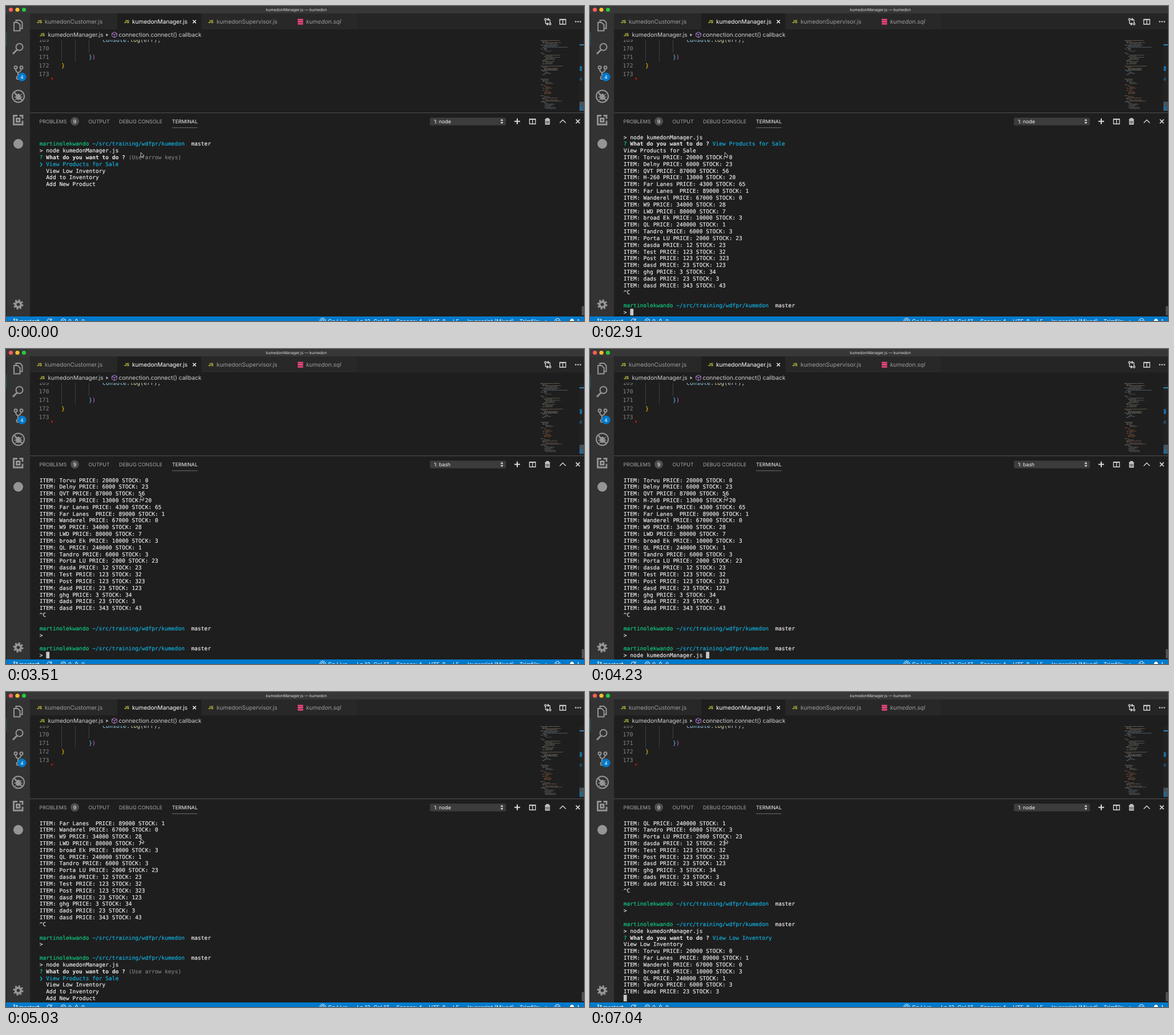
Write an HTML page that moves like this. It is 1013 px wide and 553 px high and loops after 8000 ms.

```html
<!DOCTYPE html>
<html lang="en">
<head>
<meta charset="utf-8">
<title>Terminal session</title>
<style>
  html, body { margin: 0; width: 100%; height: 100%; overflow: hidden; background: #1e1e1e; }
  svg { display: block; }
  text { font-family: Inter, Roboto, sans-serif; font-size: 10.15px; text-rendering: geometricPrecision; white-space: pre; fill: #d0d0d0; }
  .mono text, #rows text { font-family: "DejaVu Sans Mono", monospace; }
  .mono text { font-size: 10px; }
  #rows text { font-size: 9.6px; color: #f0f0f0; }
  #rows text, #rows tspan { fill: currentColor; stroke: currentColor; stroke-width: .15; }
  #rows .g { color: #10ce85; }
  #rows .c { color: #10b4e4; }
  #rows .d { color: #808080; }
  #rows .b { font-weight: bold; stroke: none; }
  .js { font-size: 7.4px; font-weight: 700; fill: #d6d640; }
  .off { fill: #9c9c9c; }
  .on { fill: #fff; }
  .caps text { font-size: 8.9px; fill: #a8a8a8; }
  .caps .on { fill: #f4f4f4; }
  .status text { font-size: 9.6px; fill: #fff; }
  .line { fill: none; stroke: #dcdcdc; stroke-width: 1.3; }
  .side { fill: none; stroke: #959595; stroke-width: 2; }
</style>
</head>
<body>
<svg width="1013" height="553" viewBox="0 0 1013 553">
  <rect width="1013" height="553" fill="#1e1e1e"/>

  <!-- title bar -->
  <rect width="1013" height="13" fill="#373737"/>
  <circle cx="8.5" cy="6.5" r="3.6" fill="#ff5f57"/>
  <circle cx="20" cy="6.5" r="3.6" fill="#febc2e"/>
  <circle cx="31.5" cy="6.5" r="3.6" fill="#28c840"/>
  <text x="509" y="9" text-anchor="middle" style="font-size:6.85px;fill:#e0e0e0">kumedonManager.js — kumedon</text>

  <!-- tabs -->
  <rect x="42" y="13" width="971" height="28" fill="#252526"/>
  <path d="M42 13h152.5v28H42zM342.5 13h156v28h-156zM499.5 13h115.5v28h-115.5z" fill="#282828"/>
  <rect x="195" y="13" width="147" height="28" fill="#1e1e1e"/>
  <text class="js" x="54" y="30.2">JS</text>
  <text class="off" x="68" y="31.2">kumedonCustomer.js</text>
  <text class="js" x="207" y="30.2">JS</text>
  <text class="on" x="221" y="31.2">kumedonManager.js</text>
  <path class="line" style="stroke:#fff" d="M327.5 24.8l5.5 5.5m0-5.5l-5.5 5.5"/>
  <text class="js" x="354.5" y="30.2">JS</text>
  <text class="off" x="369" y="31.2">kumedonSupervisor.js</text>
  <g fill="#e8457a">
    <rect x="511" y="22.5" width="10" height="3" rx="1.4"/>
    <rect x="511" y="26.1" width="10" height="3" rx="1.4"/>
    <rect x="511" y="29.7" width="10" height="3" rx="1.4"/>
  </g>
  <text class="off" x="526" y="31.2" font-style="italic">kumedon.sql</text>
  <g class="line">
    <circle cx="945.5" cy="23.5" r="1.6"/><circle cx="953.5" cy="31.5" r="1.6"/>
    <path d="M945.5 25v4.5q0 2 2 2h2.5m-2-2.3l2.3 2.3l-2.3 2.3M953.5 30v-4.500q0-2-2-2h-2.5m2-2.300l-2.300 2.300l2.300 2.300"/>
    <path d="M970.5 23.5h10.5v8.5h-10.5zM975.8 23.5v8.5M970.5 24h10.5"/>
  </g>
  <g fill="#dcdcdc"><circle cx="998.5" cy="27.5" r="1.2"/><circle cx="1002.5" cy="27.5" r="1.2"/><circle cx="1006.5" cy="27.5" r="1.2"/></g>

  <!-- editor -->
  <g class="mono" id="code">
    <path d="M97.5 59v38M121.5 59v38M145.5 59v23" stroke="#404040" fill="none"/>
    <text x="169" y="63" style="fill:#9cdcfe">console<tspan fill="#d4d4d4">.</tspan><tspan fill="#dcdcaa">log</tspan><tspan fill="#d4d4d4">(err);</tspan></text>
    <text x="145" y="93" style="fill:#5cc8f5">}<tspan fill="#da70d6">)</tspan></text>
    <text x="97" y="108" style="fill:#ffd700">}</text>
    <path d="M79.5 125l3.5 2.5l-3.5 2.5z" fill="#c4161c"/>
  </g>
  <rect x="42" y="41" width="971" height="18.5" fill="#1e1e1e"/>
  <text class="js" x="59" y="53.3">JS</text>
  <text x="73.5" y="54.2">kumedonManager.js</text>
  <path d="M175.5 48l4 2.700l-4 2.700z" fill="#aaa"/>
  <path d="M190 45.8l4.3 2.2v5l-4.3 2.3l-4.3-2.3v-5zM185.7 48l4.3 2.3l4.3-2.3M190 50.3v5" fill="none" stroke="#b180d7"/>
  <text x="197.5" y="54.2">connection.connect() callback</text>
  <g id="map"></g>
  <rect x="1005" y="60" width="8" height="127" fill="#222"/>
  <g fill="#1b6aa0">
    <rect x="1005" y="67.5" width="8" height="1.5" fill="#3aa0dc"/>
    <rect x="1005.5" y="105.5" width="4" height="8.5"/>
    <rect x="1005.5" y="126" width="4" height="5" fill="#1d4d6b"/>
    <rect x="1005" y="168" width="8" height="16" fill="#47535b"/>
    <rect x="1005.5" y="176" width="4" height="8"/>
  </g>

  <!-- panel header -->
  <path d="M42 187.5h971" stroke="#505050"/>
  <g class="caps">
    <text x="58.5" y="205.7">PROBLEMS</text>
    <circle cx="120.5" cy="202.5" r="7.5" fill="#4d4d4d"/>
    <text class="on" x="120.5" y="205.7" text-anchor="middle">9</text>
    <text x="144.5" y="205.7">OUTPUT</text>
    <text x="198" y="205.7">DEBUG CONSOLE</text>
    <text class="on" x="291" y="205.7">TERMINAL</text>
    <path d="M291 213.7h44.5" stroke="#707070"/>
    <rect x="743" y="196" width="133" height="13.5" rx="2" fill="#3c3c3c"/>
    <text class="on" id="shell" x="750" y="205.7">1: node</text>
  </g>
  <path d="M866.5 201.5l2.5-3.3l2.5 3.3zM866.5 203.7l2.5 3.3l2.5-3.3z" fill="#e4e4e4"/>
  <g class="line">
    <path d="M896 197.5v10M891 202.5h10" style="stroke-width:2"/>
    <path d="M917.5 198.5h10.5v8.5h-10.5zM922.8 198.5v8.5M917.5 199h10.5"/>
    <path d="M944.5 199.2h9M947.3 199v-1.5h3.4v1.5"/>
    <path d="M945.5 200.5h7v7h-7zM947.7 201v6M950.3 201v6"/>
    <path d="M970.5 205.3l5.3-5.3l5.3 5.3"/>
    <path d="M998.8 199.2l6.800 6.800m0-6.800l-6.800 6.800" style="stroke-width:1.7"/>
  </g>
  <rect x="1009" y="527" width="4" height="16" fill="#505050"/>

  <!-- terminal -->
  <g id="rows"></g>
  <rect id="caret" width="5.8" height="11.6" fill="#c8c8c8"/>
  <path d="M236.3 257v8.6l2-1.8l1.4 3l1.4-.7l-1.4-2.8h2.6z" fill="#111" stroke="#e8e8e8" stroke-width=".8"/>

  <!-- activity bar -->
  <rect y="13" width="42" height="532" fill="#333"/>
  <rect y="13" width="1" height="532" fill="#1c1c1c"/>
  <rect y="45" width="1" height="24" fill="#0e5a66"/>
  <g class="side">
    <path d="M17.5 29v-4h7l4 4v10.5h-4"/>
    <path d="M14 29h6.5l4 4v10.5H14z"/>
    <circle cx="23.5" cy="72" r="6"/><path d="M19 77l-7 7" style="stroke-width:3"/>
    <circle cx="17" cy="108" r="2.5"/><circle cx="27" cy="108" r="2.5"/><circle cx="21" cy="126" r="2.5"/>
    <path d="M17 110.5q0 5 4 6.5q5-1.5 6-6.5M21 117v6.5"/>
    <circle cx="21.5" cy="158.5" r="10.5"/>
    <ellipse cx="21.5" cy="159.5" rx="3.5" ry="4.5" fill="#959595"/>
    <path d="M15 155l4 2M28 155l-4 2M14.5 160h14M15.5 165l4-2M27.5 165l-4-2" style="stroke-width:1.3"/>
    <path d="M14 151l15 15"/>
    <path d="M20 192.5h-6.500v15.500h15.500v-6.500M23.500 192.500h5.500v5.500M18.500 197.500h5.500v5.500h-5.500z" style="stroke-width:2.800"/>
    <circle cx="21.5" cy="524" r="4.8" style="stroke-width:4"/>
    <circle cx="21.5" cy="524" r="7.5" stroke-dasharray="2.945" style="stroke-width:3"/>
  </g>
  <circle cx="21.5" cy="242" r="8.5" fill="#959595"/>
  <circle cx="28" cy="124.5" r="7.5" fill="#007acc"/>
  <text class="on" x="28" y="127.6" text-anchor="middle" style="font-size:8.5px">4</text>

  <!-- status bar -->
  <rect y="545" width="1013" height="8" fill="#007acc"/>
  <g class="status" id="status">
    <g fill="none" stroke="#fff">
      <circle cx="14.5" cy="550" r="1.2"/><circle cx="19" cy="551" r="1.2"/><path d="M14.5 551v3"/>
      <path d="M72 553a4 4 0 0 1 7-2.5m1-2v3h-3"/>
      <circle cx="100.5" cy="553" r="4"/><path d="M99 551.5l3 3m0-3l-3 3M119.5 556l4-7l4 7z"/>
      <circle cx="555" cy="553" r="5"/><circle cx="555" cy="553" r="2.5"/>
      <circle cx="966.5" cy="553" r="4.5"/>
    </g>
    <path d="M964 551h1.5v1.5h-1.5zM967.5 551h1.5v1.5h-1.5zM988 554q1-5 4-5t4 5z" fill="#fff"/>
  </g>
</svg>

<script>
const $ = id => document.getElementById(id);
const LOOP = 8000, ROWS = 27, LINE_H = 11.83, CHAR_W = 5.779, LEFT = 58.8;

// static repeats
for (let n = 169; n <= 173; n++)
  $("code").innerHTML += `<text x="75.5" y="${63 + (n - 169) * 15}" text-anchor="end" style="fill:#858585">${n}</text>`;

$("status").innerHTML += [
  [23, "master*"], [109, "0"], [132, "0"], [564, "Go Live"], [615, "Ln 12, Col 17"], [684, "Spaces: 4"],
  [741, "UTF-8"], [783, "LF"], [806, "Javascript (Mixed)"], [900, "Trimfile: ✓"], [1001, "1"]
].map(([x, s]) => `<text x="${x}" y="556.5">${s}</text>`).join("");

// minimap: blocks of [first y, last y, widest line, colour]
const rand = n => Math.abs(Math.sin(n * 12.9898) * 43758.5453) % 1;
const blocks = [
  [60, 67, 48, "#b5a08c"], [68, 74, 66, "#8fa5b0"], [75, 80, 14, "#888"], [82, 102, 26, "#9a9a88"],
  [105, 111, 42, "#b09a80"], [112, 120, 30, "#8fa5b0"], [128, 137, 18, "#a0a090"],
  [138, 154, 20, "#c07850"], [157, 167, 38, "#b09080"], [168, 181, 24, "#8f9ca5"]
];
let map = "";
for (const [top, end, wide, color] of blocks)
  for (let y = top; y < end; y += 1.9) {
    const indent = y === top ? 0 : 3 + Math.floor(rand(y) * 3) * 3;
    const w = 4 + (wide - 4) * rand(y + 7) ** 1.5;
    map += `<path d="M${937 + indent} ${y + .5}h${w}" stroke="${color}" stroke-dasharray="4 .8 2.5 .6" opacity=".55"/>`;
  }
$("map").innerHTML = map;

// terminal contents
const span = (cls, s) => `<tspan class="${cls}">${s}</tspan>`;
const item = ([name, price, stock]) => `ITEM: ${name} PRICE: ${price} STOCK: ${stock}`;
const stock = [
  ["Torvu", 20000, 0], ["Delny", 6000, 23], ["QVT", 87000, 56], ["H-260", 13000, 20],
  ["Far Lanes", 4300, 65], ["Far Lanes ", 89000, 1], ["Wanderel", 67000, 0], ["W9", 34000, 28],
  ["LWD", 80000, 7], ["broad Ek", 10000, 3], ["QL", 240000, 1], ["Tandro", 6000, 3],
  ["Porta LU", 2000, 23], ["dasda", 12, 23], ["Test", 123, 32], ["Post", 123, 323],
  ["dasd", 23, 123], ["ghg", 3, 34], ["dads", 23, 3], ["dasd", 343, 43]
];
const options = ["View Products for Sale", "View Low Inventory", "Add to Inventory", "Add New Product"];
const prompt = ["", span("g", "martinolekwando") + " " + span("c", "~/src/training/wdfpr/kumedon") + "  master"];
const command = "&gt; node kumedonManager.js";
const ask = tail => span("g", "?") + " " + span("b", "What do you want to do ?") + " " + tail;
const menu = (pick, hint = "") => [
  ask(span("d", hint)),
  ...options.map((s, i) => i === pick ? span("c", "❯ " + s) : "  " + s)
];
const report = (pick, list) => [ask(span("c", options[pick])), options[pick], ...list.map(item)];

const HINT = "(Use arrow keys)";
const start = [...prompt, command];
const listed = [...start, ...report(0, stock)];
const stopped = [...listed, "^C", ...prompt];
const again = [...stopped, "&gt;", ...prompt];
const rerun = [...again, command];
const low = stock.filter(([, , count]) => count < 5);

// [time, lines, caret column or -1, shell]
const steps = [
  [0, [...start, ...menu(0, HINT)], -1, "node"],
  [1320, [...listed, ""], 0, "node"],
  [2910, [...stopped, "&gt;"], 2, "node"],
  [3120, [...stopped, "&gt;"], 2, "bash"],
  [3510, [...again, "&gt;"], 2, "bash"],
  [4230, rerun, 25, "bash"],
  [4440, [...rerun, ""], 0, "bash"],
  [4610, [...rerun, ""], 0, "node"],
  [5030, [...rerun, ...menu(0, HINT)], -1, "node"],
  [5570, [...rerun, ...menu(1)], -1, "node"],
  [7040, [...rerun, ...report(1, low), ""], 0, "node"]
];

function show([, lines, col, shell]) {
  const view = lines.slice(-ROWS);
  $("rows").innerHTML = view.map((s, i) =>
    `<text x="${LEFT}" y="${(233.5 + i * LINE_H).toFixed(2)}">${s}</text>`).join("");
  const caret = $("caret");
  caret.setAttribute("visibility", col < 0 ? "hidden" : "visible");
  caret.setAttribute("x", LEFT + Math.max(col, 0) * CHAR_W);
  caret.setAttribute("y", 224 + (view.length - 1) * LINE_H);
  $("shell").textContent = "1: " + shell;
}

let current;
const origin = performance.now();
function tick() {
  const t = (performance.now() - origin) % LOOP;
  const step = steps.findLast(s => s[0] <= t) || steps[0];
  if (step !== current) show(current = step);
  requestAnimationFrame(tick);
}
tick();
</script>
</body>
</html>
```
